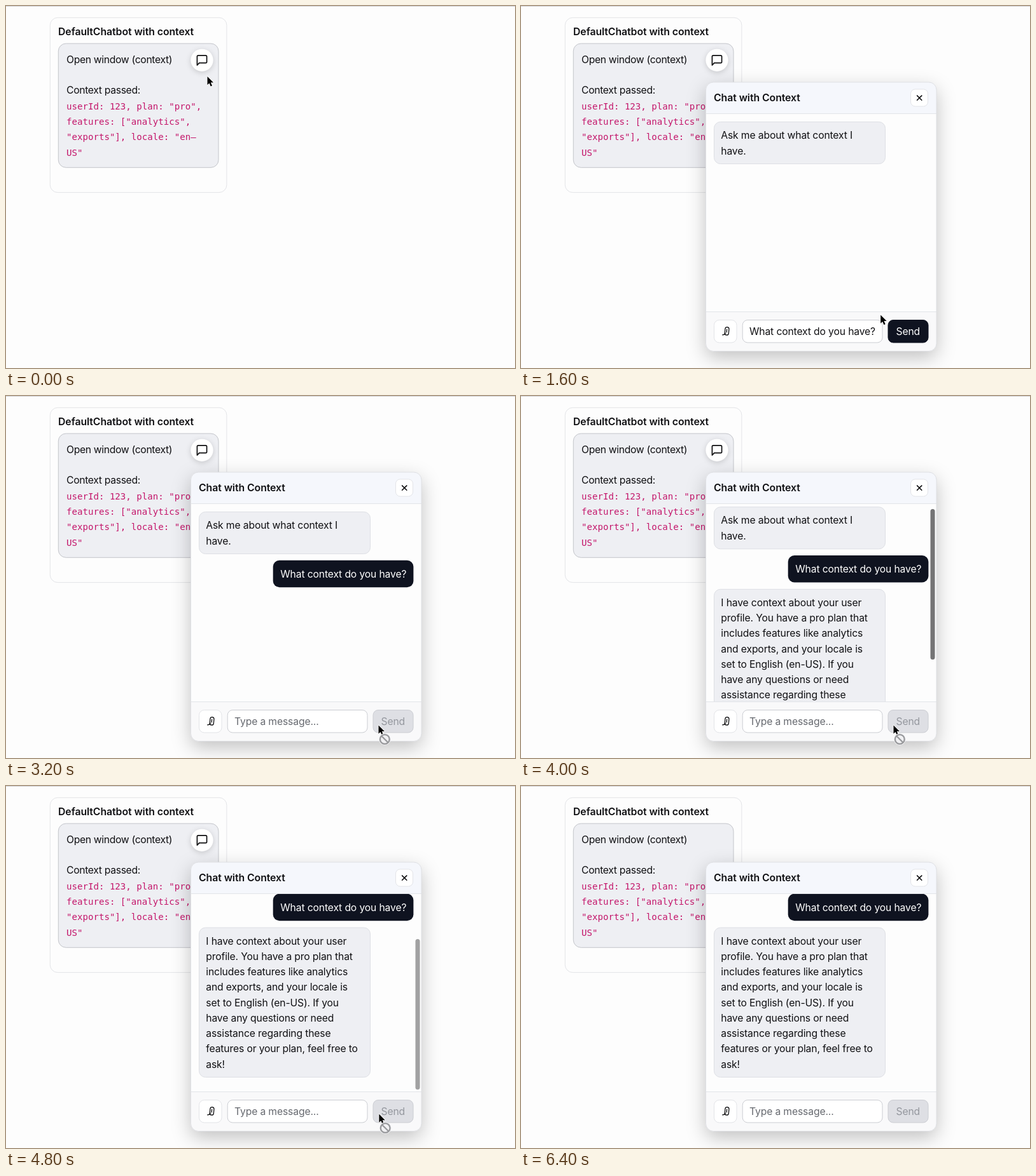
Animation, 800 px wide and 570 px high, one loop 6500 ms. Source, as an HTML page:

```html
<!DOCTYPE html>
<html lang="en">
<head>
<meta charset="utf-8">
<title>Chat with context</title>
<style>
  html, body { margin: 0; width: 100%; height: 100%; overflow: hidden; background: #fdfdfd; }
  svg { display: block; width: 800px; height: 570px; }
  text { font: 15.7px Inter, "Liberation Sans", sans-serif; letter-spacing: -0.14px; fill: #101013; }
  .tight { letter-spacing: -0.32px; }
  .bold { font-size: 15.8px; font-weight: 600; letter-spacing: -0.06px; }
  .code text { font: 14.1px "DejaVu Sans Mono", monospace; letter-spacing: 0; fill: #c4176b; }
  .light { fill: #fff; }
  .line { fill: none; stroke: #0c0c0e; stroke-linecap: round; stroke-linejoin: round; }
  .card { fill: #fdfdfd; stroke: #e3e4e7; }
  .soft { fill: #eeeff3; stroke: #dddfe4; }
  .dark { fill: #0f1320; }
  .button { fill: #fff; stroke: #e3e4e8; }
</style>
</head>
<body>
<svg viewBox="0 0 800 570" xmlns="http://www.w3.org/2000/svg">
  <defs>
    <clipPath id="panelClip"><rect x="290.5" y="120" width="362.5" height="423.5" rx="12"/></clipPath>
    <clipPath id="bodyClip"><rect x="291" y="170" width="362" height="311"/></clipPath>
  </defs>

  <rect width="800" height="570" fill="#fdfdfd"/>
  <rect width="800" height="1" fill="#d3d4d6"/>
  <rect class="card" x="69.3" y="18.3" width="277.6" height="275.3" rx="12"/>
  <text class="bold" x="82" y="46.3">DefaultChatbot with context</text>
  <rect x="82.3" y="59.1" width="251.7" height="195.2" rx="12" fill="#eeeff3" stroke="#c3c5ca"/>
  <text class="tight" x="95" y="90">Open window (context)</text>
  <text class="tight" x="95" y="138.4">Context passed:</text>
  <g class="code" id="code"></g>

  <g id="bubble">
    <circle cx="308" cy="85.3" r="17.6" fill="#fff" style="filter:drop-shadow(0 2px 4px rgba(0,0,0,.16))"/>
    <path class="line" stroke-width="2" transform="translate(297.9 75.4) scale(.84)"
      d="M21 15a2 2 0 0 1-2 2H7l-4 4V5a2 2 0 0 1 2-2h14a2 2 0 0 1 2 2z"/>
  </g>

  <g id="panel">
    <rect x="290.5" y="120" width="362.5" height="423.5" rx="12" fill="#fdfdfd"
      style="filter:drop-shadow(0 10px 15px rgba(0,0,0,.24))"/>
    <g clip-path="url(#panelClip)">
      <rect x="290" y="120" width="364" height="49" fill="#f5f7fc"/>
      <rect x="290" y="169" width="364" height="1" fill="#e2e4e8"/>
      <rect x="290" y="481" width="364" height="63" fill="#f9f9fa"/>
      <rect x="290" y="481" width="364" height="1" fill="#e2e4e8"/>
    </g>
    <rect x="290.5" y="120" width="362.5" height="423.5" rx="12" fill="none" stroke="#dfe0e4"/>
    <text class="bold" x="303" y="150.3">Chat with Context</text>
    <rect class="button" x="612.5" y="131" width="27" height="27" rx="7"/>
    <path class="line" stroke-width="1.6" d="M622.6 141.1l7.2 7.2m0-7.2l-7.2 7.2"/>

    <g clip-path="url(#bodyClip)">
      <g id="thread">
        <rect class="soft" x="303.5" y="182.5" width="269" height="66" rx="10"/>
        <g id="greeting"></g>
        <g id="question">
          <rect class="dark" x="419.7" y="258.7" width="220.7" height="42.5" rx="10"/>
          <text class="light" x="431.3" y="286.2">What context do you have?</text>
        </g>
        <g id="reply">
          <rect class="soft" x="303.5" y="312" width="269" height="235.5" rx="10"/>
        </g>
      </g>
      <rect id="bar" x="643.5" y="172" width="7" height="237" rx="3.5" fill="#747475"/>
    </g>

    <rect class="button" x="303.5" y="494.5" width="35.5" height="35.5" rx="8"/>
    <g class="line" stroke-width="1.3">
      <rect x="320.6" y="505.6" width="6" height="12.6" rx="3" transform="rotate(5 323.6 512)"/>
      <path d="M316.6 517.8c2 .2 3.6-.9 4.6-2.8M323.6 509.2l-.4 4.4"/>
    </g>
    <rect x="348.2" y="494.5" width="219.8" height="35.5" rx="8" fill="#fff" stroke="#cbcdd2"/>
    <text id="input" x="359" y="518.3"></text>
    <rect id="sendBox" x="577" y="494.5" width="63" height="35.5" rx="8"/>
    <text id="sendText" x="589.5" y="518.3">Send</text>
  </g>

  <g id="cursor">
    <g id="arrow">
      <path d="M0 0V13.2L3 10.5L5.2 15.6L7.5 14.6L5.3 9.6H9.5Z" fill="#000" stroke="#fff"
        stroke-width="1.6" stroke-linejoin="round" paint-order="stroke"/>
    </g>
    <g id="blocked" fill="none" transform="translate(9.8 22)">
      <circle r="7.4" fill="#f1f1f3" stroke="#f1f1f3" stroke-width="4.2"/>
      <circle r="7.4" stroke="#98999c" stroke-width="2.3"/>
      <path d="M-5 -5L5 5" stroke="#98999c" stroke-width="2.3"/>
    </g>
    <g id="hand" fill="#fff" stroke="#000" stroke-linejoin="round" stroke-linecap="round">
      <path d="M-1.5 9.5V1.3a1.4 1.4 0 0 1 2.8 0V6.3c.2-1.2 2.6-1.1 2.8.2c.4-1 2.5-.8 2.7.5
        c.5-.8 2.5-.5 2.5 1.2V11c0 2-1.3 3-1.4 5.3H.6C.3 14.2-2.6 12.6-3.9 9.9C-4.8 8.2-3 7.3-1.5 9.5Z"/>
      <path d="M1.7 10.6v3.4M4.1 10.6v3.4M6.5 10.6v3.4" stroke-width=".9"/>
    </g>
  </g>
</svg>
<script>
const LOOP = 6500, STEP = 100;
const QUESTION = "What context do you have?";
const $ = id => document.getElementById(id);

function addLines(id, x, y, gap, lines) {
  lines.forEach((line, i) => {
    const node = document.createElementNS("http://www.w3.org/2000/svg", "text");
    node.setAttribute("x", x);
    node.setAttribute("y", y + i * gap);
    node.textContent = line;
    $(id).append(node);
  });
}

addLines("code", 95, 163, 24.2, [
  'userId: 123, plan: "pro",',
  'features: ["analytics",',
  '"exports"], locale: "en–',
  'US"'
]);
addLines("greeting", 314.3, 209.2, 24.3, ["Ask me about what context I", "have."]);
addLines("reply", 314.3, 338.6, 24.25, [
  "I have context about your user",
  "profile. You have a pro plan that",
  "includes features like analytics",
  "and exports, and your locale is",
  "set to English (en-US). If you",
  "have any questions or need",
  "assistance regarding these",
  "features or your plan, feel free to",
  "ask!"
]);

const clamp = v => Math.max(0, Math.min(1, v));
const smooth = v => v * v * (3 - 2 * v);

// Value i of the keyed list [time, ...values] at time t.
function track(keys, t, i, ease = smooth) {
  let n = 0;
  while (n < keys.length - 2 && t >= keys[n + 1][0]) n++;
  const a = keys[n], b = keys[n + 1];
  return a[i] + (b[i] - a[i]) * ease(clamp((t - a[0]) / (b[0] - a[0])));
}

const path = [
  [0, 316.5, 111], [300, 311.5, 86], [1100, 311.5, 86], [1700, 585.5, 518.5],
  [4700, 585.5, 518.5], [5100, 591, 506], [5600, 591, 506], [5800, 645, 47]
];
const scrolls = [[3900, 0], [4000, 7.7], [4100, 52], [4200, 89]];

const show = (id, on) => { $(id).style.display = on ? "" : "none"; };
const inBox = (x, y, l, t, r, b) => x >= l && x <= r && y >= t && y <= b;

function draw(t) {
  const open = t >= 500, sent = t >= 1900, replied = t >= 3900;
  show("panel", open);
  show("bubble", t < 5900);
  show("question", sent);
  show("reply", replied);

  const typed = sent ? "" : QUESTION.slice(0, Math.round(QUESTION.length * clamp((t - 500) / 300)));
  const input = $("input"), box = $("sendBox");
  input.textContent = typed || "Type a message...";
  input.style.fill = typed ? "#101013" : "#66696f";
  box.setAttribute("fill", typed ? "#0f1320" : "#dedfe4");
  box.setAttribute("stroke", typed ? "#0f1320" : "#cbcdd2");
  $("sendText").style.fill = typed ? "#fff" : "#94979e";

  const scroll = track(scrolls, t, 1, v => v);
  $("thread").setAttribute("transform", `translate(0 ${-scroll})`);
  $("bar").setAttribute("y", 172 + scroll * 0.775);
  $("bar").style.opacity = replied ? 1 - clamp((t - 4700) / 300) : 0;

  const x = track(path, t, 1), y = track(path, t, 2);
  const overSend = open && inBox(x, y, 577, 494, 640, 530);
  const overClose = open && inBox(x, y, 612, 131, 640, 158);
  const overBubble = Math.hypot(x - 308, y - 85) < 17.6;
  const hand = overBubble || overClose || (overSend && !!typed);
  show("cursor", t < 5900);
  show("hand", hand);
  show("arrow", !hand);
  show("blocked", overSend && !typed);
  $("cursor").setAttribute("transform", `translate(${x} ${y})`);
}

const start = performance.now();
function tick() {
  const t = (performance.now() - start) % LOOP;
  draw(Math.floor(t / STEP) * STEP);
  requestAnimationFrame(tick);
}
tick();
</script>
</body>
</html>
```
